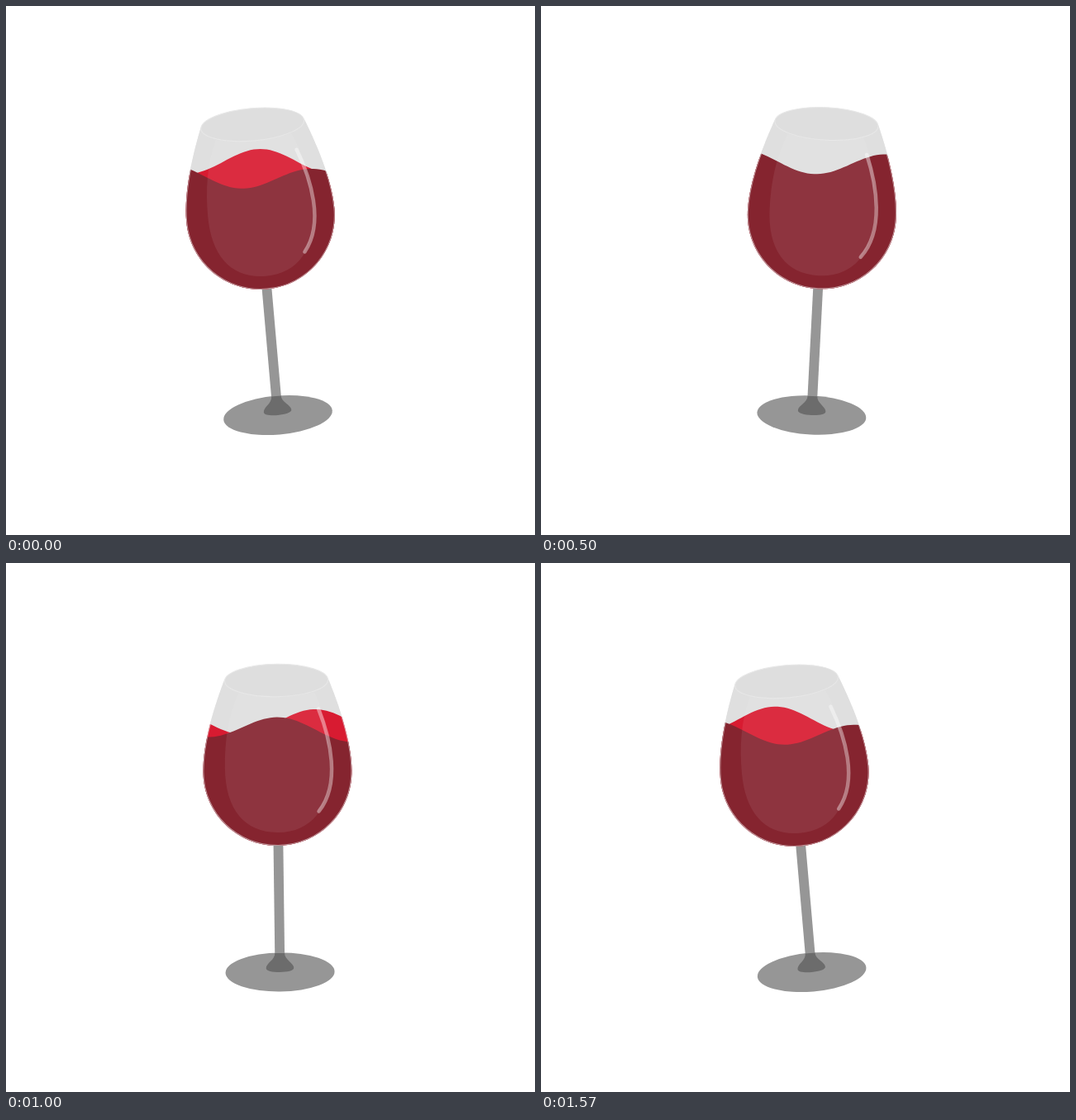
Write an HTML page with a canvas that moves like this. It is 640x640 px and loops after 1640 ms.

```html
<!DOCTYPE html>
<html lang="en">
<head>
<meta charset="utf-8">
<title>Swirling wine</title>
<style>
  html, body { margin: 0; width: 100%; height: 100%; overflow: hidden; background: #fff; }
  canvas { display: block; width: 640px; height: 640px; }
</style>
</head>
<body>
<canvas id="stage" width="640" height="640"></canvas>
<script>
const ctx = document.getElementById('stage').getContext('2d');
const LOOP = 1640, FPS = 14, STEPS = 23, SWIRLS = 2;
const FOOT_Y = 495, LEVEL = 205, WAVE = 176;
const TAU = 2 * Math.PI;

// Tilt in degrees at parts of one swirl.
const tilts = [[0, -5], [.48, 5], [.77, 0], [.92, -5], [1, -5]];

function tiltAt(p) {
  const i = tilts.findIndex(([at]) => at > p);
  const [a, from] = tilts[i - 1], [b, to] = tilts[i];
  const ease = (1 - Math.cos(Math.PI * (p - a) / (b - a))) / 2;
  return (from + (to - from) * ease) * Math.PI / 180;
}

function ellipse(x, y, rx, ry) {
  const p = new Path2D();
  p.ellipse(x, y, rx, ry, 0, 0, TAU);
  return p;
}

// Glass parts, with the middle of the foot at 0,0.
const base = ellipse(0, 0, 66, 23.5);
const rim = ellipse(0, -353, 62.5, 19.7);
const bowl = new Path2D('M-62.5-355C-74.5-325-90-279-90-243C-90-193-50-153 0-153S90-193 90-243C90-279 74.5-325 62.5-355Z');
const inner = new Path2D('M-46-338C-59-310-63.5-280-63.5-247C-63.5-197-40-169 0-169S63.5-197 63.5-247C63.5-280 59-310 46-338Q0-328-46-338Z');
const knob = new Path2D('M-6-23H5.8C5.5-15 16.8-11 16.8-5C16.8-1.5 8.5 0 0 0S-16.8-1.5-16.8-5C-16.8-11-5.5-15-6-23Z');
const shine = new Path2D('M50.5-318C64.5-282 76.5-227 49.5-194');

function fill(path, color) {
  ctx.fillStyle = color;
  ctx.fill(path);
}

function line(path, color, width) {
  ctx.strokeStyle = color;
  ctx.lineWidth = width;
  ctx.stroke(path);
}

// Wine below a sine surface; the trough of the wave lies at shift.
function wine(mid, level, height, shift, slope, color) {
  const p = new Path2D();
  p.moveTo(mid - 100, 360);
  for (let u = -100; u <= 100; u += 4)
    p.lineTo(mid + u, level + slope * u + height * Math.cos(TAU * (u - shift) / WAVE));
  p.lineTo(mid + 100, 360);
  fill(p, color);
}

function draw(p) {
  const cos = Math.cos(TAU * p), sin = Math.sin(TAU * p);
  const tilt = tiltAt(p), x = 329 + 2.6 * sin;
  const mid = x + (FOOT_Y - LEVEL) * Math.tan(tilt);

  ctx.clearRect(0, 0, 640, 640);
  ctx.save();
  ctx.translate(x, FOOT_Y);
  ctx.rotate(tilt);
  ctx.lineCap = 'round';

  fill(base, '#969696');
  ctx.fillStyle = '#969696';
  ctx.fillRect(-6, -154, 11.8, 131.5);
  fill(knob, '#6c6c6c');
  fill(bowl, '#dfdfdf');

  // The wine keeps to the stage while the tilted bowl cuts it off.
  // The far wave runs right, the near one left.
  ctx.save();
  ctx.clip(bowl);
  const tilted = ctx.getTransform();
  ctx.resetTransform();
  wine(mid, 193 - 5 * cos, -15, -6 + WAVE * p + 10 * cos + 12 * sin, 0, '#d81b31');
  wine(mid, 198 + 10 * cos, 13.5, -54 - WAVE * p + 34 * cos, .035, '#85242f');
  ctx.setTransform(tilted);
  line(bowl, 'rgba(223,223,223,.6)', 2);
  ctx.restore();

  fill(inner, 'rgba(255,255,255,.075)');
  line(shine, 'rgba(255,255,255,.4)', 4.5);
  fill(rim, '#dedede');
  line(rim, '#e8e8e8', 1);
  ctx.restore();
}

function tick() {
  const t = performance.now() % LOOP;
  const step = Math.floor((t + 5) * FPS / 1000) % STEPS;
  draw(step * SWIRLS / STEPS % 1);
  requestAnimationFrame(tick);
}
tick();
</script>
</body>
</html>
```
